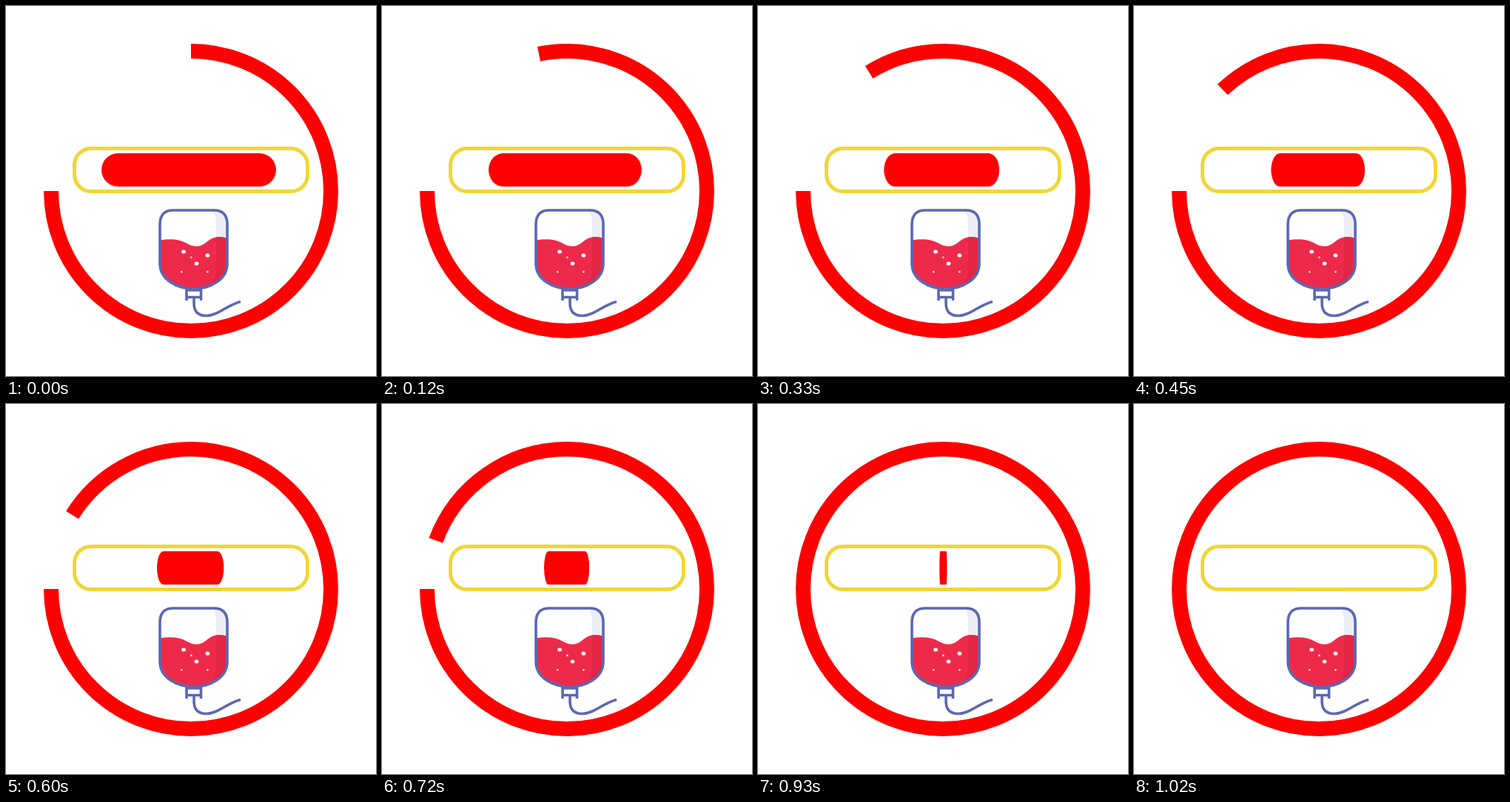
Write an HTML page that moves like this. It is 500 by 500 pixels and loops after 1850 ms.

```html
<!DOCTYPE html>
<html lang="en">
<head>
<meta charset="utf-8">
<title>Blood bag loader</title>
<style>
  html, body { margin: 0; width: 100%; height: 100%; overflow: hidden; background: #fff; }
  svg { display: block; width: 100vw; height: 100vh; }
</style>
</head>
<body>
<svg viewBox="0 0 500 500" fill="none">
  <defs>
    <path id="body" d="M226 276H281Q299 276 299 295V348C299 370 276 382 253.500 382C231 382 208 370 208 348V295Q208 276 226 276Z"/>
    <clipPath id="inside"><use href="#body"/></clipPath>
  </defs>

  <path id="ring" d="M61 250A189 189 0 0 0 439 250A189 189 0 0 0 61 250" pathLength="360" stroke="#f00" stroke-width="20"/>
  <rect x="92.500" y="192.500" width="315" height="58" rx="22.500" stroke="#f0d633" stroke-width="5"/>
  <rect id="bar" y="199" height="45" ry="22.500" fill="#f00"/>

  <g clip-path="url(#inside)">
    <path d="M277 275Q284 281 284 294V330H302V275Z" fill="#ecedf7"/>
    <path id="blood" d="M205 317C221 314 234 315 243 320C254 327 263 326 271 319C280 311 289 310 302 315V386H205Z" fill="#ee2a4b"/>
    <path d="M284 312.500Q292 311 302 315V372L270 386Q284 373 284 352Z" fill="#e32645"/>
  </g>
  <g fill="#fff">
    <ellipse cx="240" cy="332" rx="2.900" ry="2.500"/>
    <ellipse cx="272.300" cy="337" rx="2.900" ry="2.600"/>
    <ellipse cx="257.500" cy="348" rx="2.900" ry="2.500"/>
    <circle cx="250.300" cy="339.800" r="1.300"/>
    <circle cx="237.300" cy="359.300" r="1.300"/>
    <circle cx="272.300" cy="359.300" r="1.300"/>
  </g>
  <g stroke="#5b68b2" stroke-width="3.600">
    <use href="#body"/>
    <path d="M244 398V384H263.500V398M244 393.500H263.500"/>
    <path d="M254 395V402C254 414 261 419 271 418.500C287 418 299 404 317 399.500"/>
  </g>
</svg>
<script>
  const LOOP = 1850, STEP = 30, LAST = 34;
  const ring = document.getElementById("ring");
  const bar = document.getElementById("bar");

  function draw(time) {
    const step = Math.min(Math.floor((time % LOOP) / STEP), LAST);
    const sweep = Math.min(360, 270 + step * 90 / 31);
    ring.setAttribute("stroke-dasharray", sweep + " 400");

    // The bar shrinks sideways, corners included, towards x = 250.5.
    const scale = Math.max(0, 1 - step / 32.4);
    bar.setAttribute("x", 250.5 - 121.5 * scale);
    bar.setAttribute("width", 236 * scale);
    bar.setAttribute("rx", 22.5 * scale);
  }

  const start = performance.now();
  function tick() {
    draw(performance.now() - start);
    requestAnimationFrame(tick);
  }
  tick();
</script>
</body>
</html>
```
